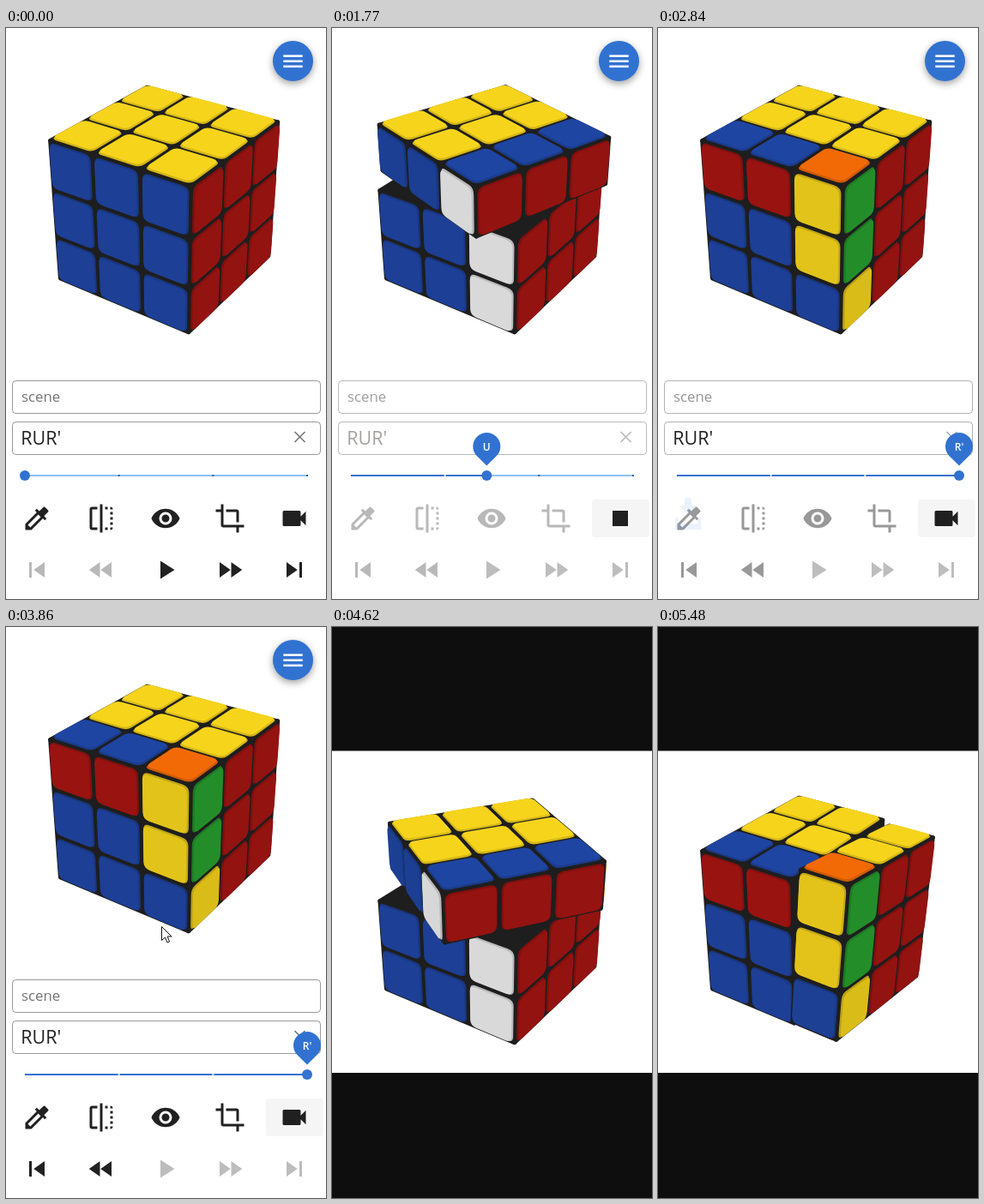
An HTML page with a canvas for the animation above (5560 ms loop, 373 px wide and 666 px high).

```html
<!DOCTYPE html>
<html lang="en">
<head>
<meta charset="utf-8">
<title>Cube player</title>
<style>
html, body { margin: 0; width: 100%; height: 100%; overflow: hidden; background: #fff; }
canvas { display: block; width: 373px; height: 666px; }
</style>
</head>
<body>
<canvas id="stage"></canvas>
<script>
const W = 373, H = 666, LOOP = 5560, STEP = LOOP / 72;
const CLICK = 980, DONE = 2790, VIDEO = 3995;
const TURN = 550, SLOT = 618, LIVE_START = 980, VIDEO_START = 3772;
const BLUE = '#3172d1', FONT = '"Open Sans", "Noto Sans", sans-serif';

const canvas = document.getElementById('stage');
const ctx = canvas.getContext('2d');
const ratio = window.devicePixelRatio || 1;
canvas.width = W * ratio;
canvas.height = H * ratio;

const clamp = v => Math.max(0, Math.min(1, v));
const mix = (a, b, p) => a + (b - a) * p;
const ramp = (t, start, length) => clamp((t - start) / length);
const easeOut = p => 1 - (1 - p) ** 2;
const easeSine = p => (1 - Math.cos(Math.PI * p)) / 2;
const black = a => `rgba(0,0,0,${a})`;

// ---- Cube ----
const YAW = 34.2 * Math.PI / 180, PITCH = 30 * Math.PI / 180;
const DISTANCE = 16.5, FOCAL = 1026;
const [sy, cy, sp, cp] = [Math.sin(YAW), Math.cos(YAW), Math.sin(PITCH), Math.cos(PITCH)];
const RIGHT = [cy, 0, -sy], UP = [-sy * sp, cp, -cy * sp], TOWARD = [sy * cp, sp, cy * cp];
const dot = (a, b) => a[0] * b[0] + a[1] * b[1] + a[2] * b[2];
const add = (a, b, k = 1) => a.map((v, i) => v + b[i] * k);
const EYE = TOWARD.map(v => v * DISTANCE);

// Face colours as [positive, negative] side of x, y, z.
const COLORS = [
  [[166, 21, 19], [242, 106, 5]],
  [[246, 212, 28], [236, 236, 236]],
  [[31, 69, 162], [40, 160, 46]]
];
const LIGHT = [0.885, 1, 0.92];
const MOVES = [{ axis: 0, dir: 1 }, { axis: 1, dir: 1 }, { axis: 0, dir: -1 }];

function rotate(v, axis, angle) {
  const i = (axis + 1) % 3, j = (axis + 2) % 3, out = v.slice();
  const c = Math.cos(angle), s = Math.sin(angle);
  out[i] = v[i] * c + v[j] * s;
  out[j] = v[j] * c - v[i] * s;
  return out;
}

function solvedCube() {
  const list = [];
  for (let axis = 0; axis < 3; axis++)
    for (const side of [1, -1])
      for (let a = -1; a < 2; a++)
        for (let b = -1; b < 2; b++) {
          const pos = [0, 0, 0], normal = [0, 0, 0];
          pos[axis] = normal[axis] = side;
          pos[(axis + 1) % 3] = a;
          pos[(axis + 2) % 3] = b;
          list.push({ pos, normal, color: COLORS[axis][side > 0 ? 0 : 1] });
        }
  return list;
}

function applyMove(cube, { axis, dir }) {
  const turn = v => rotate(v, axis, dir * Math.PI / 2).map(Math.round);
  return cube.map(s => s.pos[axis] === 1
    ? { ...s, pos: turn(s.pos), normal: turn(s.normal) } : s);
}

const states = [solvedCube()];
MOVES.forEach((move, i) => states.push(applyMove(states[i], move)));

function project(p, centerY) {
  const k = FOCAL / (DISTANCE - dot(p, TOWARD));
  return [187 + dot(p, RIGHT) * k, centerY - dot(p, UP) * k];
}

const facesEye = (point, normal) => dot(normal, add(EYE, point, -1)) > 0;

// The thick round stroke softens the edges of the body.
function drawBox(low, high, spin, centerY) {
  ctx.fillStyle = ctx.strokeStyle = '#1e1e1e';
  ctx.lineWidth = 5;
  ctx.lineJoin = 'round';
  for (let axis = 0; axis < 3; axis++)
    for (const side of [1, -1]) {
      const i = (axis + 1) % 3, j = (axis + 2) % 3, normal = [0, 0, 0];
      normal[axis] = side;
      const corners = [[0, 0], [1, 0], [1, 1], [0, 1]].map(([a, b]) => {
        const p = [0, 0, 0];
        p[axis] = side > 0 ? high[axis] : low[axis];
        p[i] = a ? high[i] : low[i];
        p[j] = b ? high[j] : low[j];
        return spin(p);
      });
      if (!facesEye(corners[0], spin(normal))) continue;
      ctx.beginPath();
      corners.forEach(p => ctx.lineTo(...project(p, centerY)));
      ctx.closePath();
      ctx.fill();
      ctx.stroke();
    }
}

function drawTile({ pos, normal, color }, spin, centerY) {
  const [a, b, c] = normal, t1 = [c, a, b], t2 = [b, c, a];
  const n = spin(normal), front = facesEye(spin(add(pos, normal, 0.5)), n);
  const light = n.reduce((sum, v, i) => sum + v * v * LIGHT[i], 0) * (front ? 1 : 0.92);

  const layer = (height, half, shade) => {
    const base = add(pos, normal, height), r = half - 0.13;
    const at = (x, y) => project(spin(add(add(base, t1, x), t2, y)), centerY);
    ctx.beginPath();
    for (const [x, y, flip] of [[1, 1, 0], [-1, 1, 1], [-1, -1, 0], [1, -1, 1]]) {
      const first = at(x * half, y * r), last = at(x * r, y * half);
      ctx.lineTo(...(flip ? last : first));
      ctx.quadraticCurveTo(...at(x * half, y * half), ...(flip ? first : last));
    }
    ctx.closePath();
    ctx.fillStyle = `rgb(${color.map(v => Math.round(v * light * shade))})`;
    ctx.fill();
  };
  layer(0.5, 0.457, 0.86);
  layer(0.53, 0.44, 1);
}

function drawGroup(tiles, low, high, spin, centerY) {
  const visible = s => facesEye(spin(add(s.pos, s.normal, 0.5)), spin(s.normal));
  tiles.filter(s => !visible(s)).forEach(s => drawTile(s, spin, centerY));
  drawBox(low, high, spin, centerY);
  tiles.filter(visible).forEach(s => drawTile(s, spin, centerY));
}

function drawCube(t, start, centerY) {
  const elapsed = Math.max(0, t - start);
  const index = Math.min(3, Math.floor(elapsed / SLOT));
  const part = index < 3 ? clamp((elapsed - index * SLOT) / TURN) : 0;
  const still = v => v, low = [-1.465, -1.465, -1.465], high = [1.465, 1.465, 1.465];
  const whole = part === 1 ? states[index + 1] : states[index];
  if (part === 0 || part === 1) return drawGroup(whole, low, high, still, centerY);

  const { axis, dir } = MOVES[index];
  const angle = dir * easeSine(part) * Math.PI / 2;
  const cutHigh = high.slice(), cutLow = low.slice();
  cutHigh[axis] = 0.465;
  cutLow[axis] = 0.535;
  drawGroup(whole.filter(s => s.pos[axis] < 1), low, cutHigh, still, centerY);
  drawGroup(whole.filter(s => s.pos[axis] === 1), cutLow, high,
    v => rotate(v, axis, angle), centerY);
}

// ---- Controls ----
const ICONS = {
  dropper: 'M20.7 5.6l-2.3-2.3c-.4-.4-1-.4-1.4 0l-3.1 3.1-2-1.9-1.4 1.4 1.4 1.4L3 16.25V21h4.75l8.92-8.92 1.42 1.42 1.41-1.41-1.92-1.92 3.12-3.12c.4-.4.4-1 0-1.45zM6.92 19L5 17.08l8.06-8.06 1.92 1.92z',
  mirror: 'M9 3H5Q3 3 3 5v14q0 2 2 2h4v-2H5V5h4zM11 1h2v22h-2zM15 3h2v2h-2zM15 19h2v2h-2zM19 7h2v2h-2zM19 11h2v2h-2zM19 15h2v2h-2zM19 3q2 0 2 2h-2zM19 21q2 0 2-2h-2z',
  eye: 'M12 4.5C7 4.5 2.7 7.6 1 12c1.7 4.4 6 7.5 11 7.5s9.3-3.1 11-7.5C21.3 7.6 17 4.5 12 4.5zM12 7a5 5 0 1 1 0 10a5 5 0 1 1 0-10zM12 9a3 3 0 1 1 0 6a3 3 0 1 1 0-6z',
  crop: 'M17 15h2V7q0-2-2-2H9v2h8zM7 17V1H5v4H1v2h4v10q0 2 2 2h10v4h2v-4h4v-2z',
  camera: 'M17 10.5V7q0-1-1-1H4Q3 6 3 7v10q0 1 1 1h12q1 0 1-1v-3.5l4 4v-11z',
  stop: 'M6 6h12v12H6z',
  first: 'M6 6h2v12H6zM9.5 12l8.5 6V6z',
  rewind: 'M11 18V6l-8.5 6zM11.5 12l8.5 6V6z',
  play: 'M8 5v14l11-7z',
  forward: 'M4 18l8.5-6L4 6zM13 6v12l8.5-6z',
  last: 'M6 18l8.5-6L6 6zM16 6v12h2V6z'
};
for (const name in ICONS) ICONS[name] = new Path2D(ICONS[name]);

function icon(name, column, y, alpha) {
  ctx.save();
  ctx.translate(36 + 75 * column - 18, y - 18);
  ctx.scale(1.5, 1.5);
  ctx.fillStyle = black(alpha);
  ctx.fill(ICONS[name], 'evenodd');
  ctx.restore();
}

function text(str, x, y, font, color, align = 'left') {
  ctx.font = `${font} ${FONT}`;
  ctx.fillStyle = color;
  ctx.textAlign = align;
  ctx.fillText(str, x, y);
}

function circle(x, y, r, color) {
  ctx.fillStyle = color;
  ctx.beginPath();
  ctx.arc(x, y, r, 0, 7);
  ctx.fill();
}

function drawMenu() {
  ctx.save();
  ctx.shadowColor = black(0.38);
  ctx.shadowBlur = 8 * ratio;
  ctx.shadowOffsetY = 3 * ratio;
  circle(334.5, 38.5, 23.5, BLUE);
  ctx.restore();
  ctx.fillStyle = '#fff';
  for (const y of [31.4, 37.5, 43.6]) ctx.fillRect(323.3, y, 22.4, 2.5);
}

function drawFields(t, dim) {
  ctx.lineWidth = 1;
  ctx.strokeStyle = black(mix(0.4, 0.27, dim));
  for (const y of [411.5, 459.5]) {
    ctx.beginPath();
    ctx.roundRect(7.5, y, 359, 38, 4);
    ctx.stroke();
  }
  text('scene', 18, 436, '16.8px', black(mix(0.55, 0.38, dim)));
  text("RUR'", 17.2, 486, '21.5px', t > CLICK && t < DONE ? '#a5a19e' : '#212121');
  ctx.strokeStyle = black(mix(0.54, 0.28, dim));
  ctx.lineWidth = 1.6;
  ctx.beginPath();
  ctx.moveTo(336.5, 471); ctx.lineTo(348.5, 483);
  ctx.moveTo(348.5, 471); ctx.lineTo(336.5, 483);
  ctx.stroke();
}

function drawSlider(t) {
  const changes = MOVES.map((_, i) => LIVE_START + 125 + i * SLOT);
  const value = changes.reduce((sum, c) => sum + easeOut(ramp(t, c, 150)), 0);
  const stepX = 329 / 3, x = 22 + stepX * value;
  ctx.fillStyle = '#8cc3f5';
  ctx.fillRect(22, 521, 329, 2);
  ctx.fillStyle = BLUE;
  ctx.fillRect(22, 521, x - 22, 2);
  for (let i = 0; i < 4; i++) {
    ctx.fillStyle = i <= value ? '#dbe8f8' : '#2b5f9e';
    if (i) ctx.fillRect(21 + stepX * i, 521, 2, 2);
  }
  circle(x, 522, 6, BLUE);

  const count = changes.filter(c => t > c).length;
  if (!count) return;
  ctx.save();
  ctx.translate(x, 522);
  const scale = easeOut(ramp(t, changes[0], 150));
  ctx.scale(scale, scale);
  ctx.fillStyle = BLUE;
  ctx.beginPath();
  ctx.arc(0, -34, 16, Math.PI * 0.75, Math.PI * 2.25);
  ctx.lineTo(0, -11.4);
  ctx.fill();
  text(['R', 'U', "R'"][count - 1], 0, -29.3, '600 12px', '#fff', 'center');
  ctx.restore();
}

function drawButtons(t, dim) {
  const tool = mix(0.87, 0.28, dim);
  if (t > CLICK) {
    ctx.fillStyle = '#f5f5f5';
    ctx.beginPath();
    ctx.roundRect(303, 550, 67, 44, 4);
    ctx.fill();
  }
  ['dropper', 'mirror', 'eye', 'crop'].forEach((name, i) => icon(name, i, 572, tool));
  icon(t > CLICK && t < DONE ? 'stop' : 'camera', 4, 572, 0.87);

  const back = mix(0.28, 0.87, ramp(t, DONE, 250));
  const ahead = mix(0.87, 0.26, ramp(t, CLICK, 230));
  ['first', 'rewind', 'play', 'forward', 'last'].forEach((name, i) =>
    icon(name, i, 632, i < 2 ? back : ahead));
}

// Browser-style download arrow that sinks while fading in and out.
function drawDownload(t) {
  const p = (t - 2808) / 645;
  if (p <= 0 || t > 3450) return;
  ctx.save();
  ctx.globalAlpha = 1 - Math.abs(2 * p - 1);
  ctx.translate(19, 544 + 76 * p);
  ctx.fillStyle = '#4480dc';
  ctx.fill(new Path2D('M12 0h8v9h6L16 20 6 9h6zM1 23h4v7h22v-7h4v14H1z'));
  ctx.restore();
}

// Pointer stops: [time, x, y]; a bare time hides it.
const POINTER = [
  [0], [208, 327, 655], [285, 301, 622], [360, 320, 592],
  [515, 322, 582], [595, 325, 571], [670, 328, 565], [750, 330, 571], [825, 331, 576],
  [1370, 328, 590], [1450, 320, 610], [1525, 312, 632], [1600, 305, 653], [1680],
  [3685, 97, 466], [3760, 218, 338], [3840, 181, 349]
];

function drawPointer(t) {
  const [, x, y] = POINTER.filter(stop => stop[0] <= t).pop();
  if (x === undefined) return;
  ctx.save();
  ctx.translate(x + 0.5, y + 0.5);
  ctx.fillStyle = '#fff';
  ctx.strokeStyle = '#111';
  ctx.lineWidth = 1;
  const arrow = new Path2D('M0 0v16l4-3.5 2.5 6 2.6-1-2.5-6h5z');
  ctx.fill(arrow);
  ctx.stroke(arrow);
  ctx.restore();
}

function drawApp(t) {
  const dim = t < DONE ? ramp(t, CLICK, 230) : 1 - ramp(t, DONE, 250);
  drawCube(t, LIVE_START, 203);
  drawMenu();
  drawFields(t, dim);
  drawSlider(t);
  drawButtons(t, dim);
  drawDownload(t);
  drawPointer(t);
}

function drawVideo(t) {
  ctx.fillStyle = '#0e0e0e';
  ctx.fillRect(0, 0, W, H);
  ctx.fillStyle = '#fff';
  ctx.fillRect(0, 144.5, W, 375.5);
  drawCube(t, VIDEO_START, 333);
}

function render(now) {
  const tick = Math.min(71, Math.floor((now % LOOP + 22) / STEP));
  const t = Math.max(0, tick * STEP - 15);
  ctx.setTransform(ratio, 0, 0, ratio, 0, 0);
  ctx.fillStyle = '#fff';
  ctx.fillRect(0, 0, W, H);
  (t < VIDEO ? drawApp : drawVideo)(t);
}

const begin = performance.now();
function loop() {
  render(performance.now() - begin);
  requestAnimationFrame(loop);
}
loop();
</script>
</body>
</html>
```
